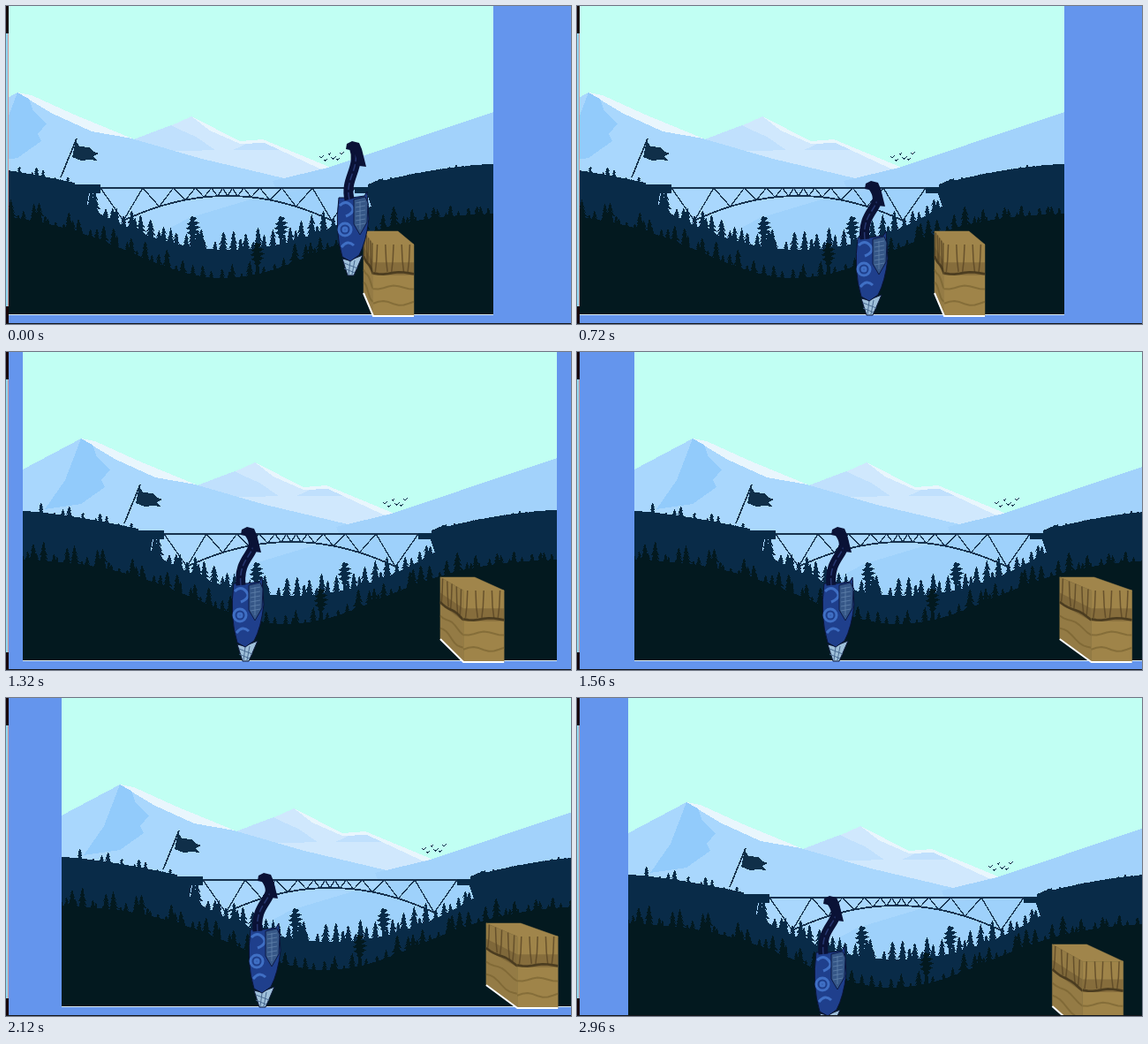
An HTML page for the animation above (3 s loop, 640x360 px).

```html
<!DOCTYPE html>
<html lang="en">
<head>
<meta charset="utf-8">
<title>Mountain bridge</title>
<style>
html, body { margin: 0; width: 100%; height: 100%; overflow: hidden; background: #6495ed; }
svg { display: block; width: 640px; height: 360px; }
</style>
</head>
<body>
<svg id="stage" viewBox="0 0 640 360">
  <clipPath id="frame"><rect y="-60" width="605" height="409"/></clipPath>
  <rect width="640" height="360" fill="#6495ed"/>
  <g id="scenery" shape-rendering="crispEdges">
    <rect y="-60" width="605" height="410" fill="#c1fff3"/>
    <g clip-path="url(#frame)">
      <path fill="#d0e8fd" d="M195 152L228 141 263 125 318 153 344 151 418 183 440 200H200Z"/>
      <path fill="#c0e0fd" d="M195 152L240 135 250 140 268 148 290 163 230 165ZM310 163L330 154 344 152 365 163Z"/>
      <path fill="#e9f6fd" d="M263 125L318 153 344 151 421 183 408 184 346 155 318 156 284 141Z"/>
      <path fill="#a9d7fd" d="M0 133L66 98 145 133 195 150 275 173 368 195 605 192V349H0Z"/>
      <path fill="#e9f6fd" d="M66 98L82 101 128 122 196 150 150 142 104 121Z"/>
      <path fill="#92cbfb" d="M66 98L79 105 84 119 99 133 89 145 93 153 66 172 25 178 48 145Z"/>
      <path fill="#a2d2fb" d="M355 198L418 183 495 157 605 120V260H380Z"/>
      <path fill="#9ed1fb" d="M195 275L260 240 330 219 390 208H470V290Z"/>
      <path stroke="#16324c" stroke-width="1.6" d="M115 194L133 150"/>
      <path fill="#102f49" d="M132 152l4 7 12 1 3 4 7 3-6 3 4 5-9-1-9 1-10-4z"/>
      <g id="birds" fill="#0d3048"></g>
      <g id="bridge" fill="none" stroke="#17324f"></g>
      <g id="forest"></g>
    </g>
    <path stroke="#dcebf2" d="M0 349.5H605"/>
  </g>
  <g id="crate" stroke-linejoin="round"></g>
  <g id="hero">
    <path fill="#9fc0da" stroke="#101c3c" d="M262 331L270 333 285 327 275 350 268 350Z"/>
    <path stroke="#496a91" d="M264 336l15 6M271 334l-2 15M276 333l-3 16M264 342l12 5"/>
    <path fill="#1f3f8c" stroke="#0a1436" d="M258 262H273L287 260 290 255 292 286Q289 312 281 327L271 334 262 329Q253 300 258 262Z"/>
    <g fill="none" stroke="#3f6fc4" stroke-width="3">
      <path d="M259 271q7-7 13 0t-6 12M261 318q7-9 14-2"/>
      <circle cx="265" cy="298" r="7"/><circle cx="265" cy="298" r="2"/>
    </g>
    <path fill="#365787" stroke="#0d1b46" d="M275 264L288 261 291 268 290 290 282 304 275 292Z"/>
    <path id="weave" stroke="#6687b0" stroke-width=".7"/>
    <path id="neck" fill="none" stroke="#0a1236" stroke-width="11"/>
    <path id="sheen" fill="none" stroke="#26366f" stroke-width="1.5" stroke-dasharray="8 3"/>
    <path fill="#0a1236" d="M266 207L267 201 273 198 281 200 284 207 289 227 281 226 275 209Z"/>
  </g>
  <g shape-rendering="crispEdges">
    <rect width="2" height="360" fill="#8fd6f0"/>
    <rect x="2" width="1" height="360" fill="#cf9698"/>
    <path fill="#160508" d="M0 0h3v31H0zM0 340h3v20H0z"/>
    <rect y="359" width="640" height="1" fill="#14161a"/>
  </g>
</svg>
<script>
const LOOP = 3000;
const $ = id => document.getElementById(id);
const steps = (n, fn) => Array.from({ length: n }, (_, i) => fn(i));
const lerp = (a, b, k) => a + (b - a) * k;
const ramp = (t, start, end) => Math.min(1, Math.max(0, (t - start) / (end - start)));

function add(parent, attrs) {
  const el = document.createElementNS('http://www.w3.org/2000/svg', 'path');
  for (const key in attrs) el.setAttribute(key, attrs[key]);
  return parent.appendChild(el);
}

function seeded(seed) {
  return () => (seed = seed * 16807 % 2147483647) / 2147483647;
}
const rand = seeded(77);

function buildBirds() {
  const d = steps(6, i => `M${407 + i * 4.6} ${170 + 4 * Math.sin(i * 2.2)}l3 1 3-2-3 4z`).join('');
  add($('birds'), { d });
}

// The truss panels shrink geometrically towards the middle of the span
function buildBridge() {
  const mid = 304, panels = 11;
  const arch = x => 215 + 28 * ((x - mid) / 118) ** 2;
  const web = side => {
    let x = mid + side * 144, d = `M${x} 206`;
    for (let i = 1; i <= panels; i++) {
      x -= side * 25.9 * .85 ** (i - 1);
      d += `L${x} ${i % 2 ? arch(x) : 206}`;
    }
    return d;
  };
  const curve = steps(60, i => `${mid - 118 + i * 4} ${arch(mid - 118 + i * 4)}`).join('L');
  add($('bridge'), { d: 'M150 206H460', 'stroke-width': 2 });
  add($('bridge'), { d: web(-1) + web(1), 'stroke-width': 1.3 });
  add($('bridge'), { d: `M${curve}`, 'stroke-width': 1.8 });
}

function conifer(x, base, height) {
  const tiers = 5, right = [], left = [];
  for (let i = 1; i <= tiers; i++) {
    const y = base - height + height * i / tiers;
    const w = 1 + height * .24 * i / tiers;
    right.push(`${x + w * (.7 + rand() * .5)} ${y}L${x + w * .45} ${y - 1}`);
    left.unshift(`${x - w * .45} ${y - 1}L${x - w * (.7 + rand() * .5)} ${y}`);
  }
  return `M${x} ${base - height}L${right.join('L')}L${left.join('L')}Z`;
}

function woods(fill, from, to, ground, gap, low, high) {
  let d = `M${from} 349`;
  for (let x = from; x <= to; x += 5) d += `L${x} ${ground(x)}`;
  d += `L${to} ${ground(to)}V349Z`;
  for (let x = from; x < to; x += gap * (.4 + 1.2 * rand())) {
    d += conifer(x, ground(x) + 4, lerp(low, high, rand() ** 1.5));
  }
  add($('forest'), { d, fill });
}

function tallTree(x, top, bottom, fill) {
  const crown = steps(5, i => {
    const y = top + i * 5, w = 4 + 5 * Math.sin(i * Math.PI / 4);
    return `M${x - w} ${y + 3}L${x - 2} ${y - 1}L${x + w} ${y + 1}L${x} ${y + 6}Z`;
  });
  add($('forest'), { d: `M${x - 1} ${top}h2l1 ${bottom - top}h-4z${crown.join('')}`, fill });
}

function buildForest() {
  const navy = '#092b48', dark = '#03191f';
  const valley = x => 276 - 52 * ((x - 306) / 165) ** 2;
  const front = x => 234 + 74 * Math.exp(-(((x - 300) / 150) ** 2));
  woods(navy, 0, 130, x => 180 + 20 * (x / 130) ** 1.4, 13, 5, 15);
  woods(navy, 130, 476, valley, 8, 12, 28);
  woods(navy, 470, 605, x => 179 + 21 * ((605 - x) / 135) ** 1.6, 9, 3, 7);
  add($('forest'), { d: 'M125 200L130 202H160V212H147L144 230H120ZM480 195L463 202V205H448V212H462L468 230H485Z', fill: navy });
  for (const x of [265, 365]) tallTree(x, 239, 290, navy);
  woods(dark, 0, 605, front, 8, 8, 26);
  tallTree(338, 269, 320, dark);
}

// Crate corners sit on two depth planes that scroll at different rates
const FAR = { depth: 1.2, left: 405, right: 444, top: 255, bottom: 325 };
const NEAR = { depth: 1.41, left: 416, right: 462, top: 270, bottom: 351 };
const HERO_DEPTH = 1.3;

const planks = steps(5, i => {
  const s = (i + .5) / 5, lean = i % 2 ? .05 : -.05;
  return [[s, 0], [s + lean / 3, .22], [s + lean, .38]];
});
const wave = (t, size, phase) => steps(9, i => [i / 8, t + size * Math.sin(i * .9 + phase)]);
const seam = [wave(.4, .015, 0)];
const grain = [wave(.6, .025, 1), wave(.82, .03, 3)];
const shadow = [[[0, .25], [1, .25], [1, .43], [0, .43]]];

const crate = $('crate');
const line = (stroke, width, opacity) =>
  add(crate, { fill: 'none', stroke, 'stroke-width': width, opacity });
const makeFace = fill => ({
  fill: add(crate, { fill, stroke: fill, 'stroke-width': .5 }),
  shade: add(crate, { fill: '#5f4c28', opacity: .4 }),
  thin: line('#5a4726', 1.5, .8), thick: line('#42351c', 2.6, .85), soft: line('#75602f', 2, .6)
});
const topFace = makeFace('#a0854b');
const sideFace = makeFace('#947b45');
const frontFace = makeFace('#9f8449');
const outline = line('#fff', 2, 1);

function drawFace(face, [a, b, c, d], isTop) {
  const at = ([s, t]) => [0, 1].map(k =>
    lerp(lerp(a[k], b[k], s), lerp(d[k], c[k], s), t).toFixed(1)).join(' ');
  const path = lines => lines.map(pts => `M${pts.map(at).join('L')}`).join('');
  face.fill.setAttribute('d', `M${[a, b, c, d].join('L')}Z`);
  if (isTop) return;
  face.shade.setAttribute('d', `${path(shadow)}Z`);
  face.thin.setAttribute('d', path(planks));
  face.thick.setAttribute('d', path(seam));
  face.soft.setAttribute('d', path(grain));
}

function drawCrate(camX, camY) {
  const [far, near] = [FAR, NEAR].map(({ depth, left, right, top, bottom }) => {
    const dx = camX * depth, dy = camY * depth;
    return [[left + dx, top + dy], [right + dx, top + dy], [right + dx, bottom + dy], [left + dx, bottom + dy]];
  });
  drawFace(topFace, [far[0], far[1], near[1], near[0]], true);
  drawFace(sideFace, [far[0], near[0], near[3], far[3]]);
  drawFace(frontFace, near);
  outline.setAttribute('d', `M${[far[3], near[3], near[2]].join('L')}`);
}

// The neck straightens while the hero is in the air
function drawNeck(air) {
  const d = `M${266 + 4 * air} 264C${262 + 2 * air} ${228 + 12 * air} ${292 - 8 * air} 228 275 204`;
  $('neck').setAttribute('d', d);
  $('sheen').setAttribute('d', d);
}

const move = (id, x, y) => $(id).setAttribute('transform', `translate(${Math.round(x)} ${Math.round(y)})`);

function render(time) {
  const t = time % LOOP;
  const fall = ramp(t, 0, 220);
  const heroX = 393 - 56 * fall - 194.5 * ramp(t, 710, 1466);
  const follow = Math.max(0, (274 - heroX) / HERO_DEPTH);
  const camX = follow + 24 * ramp(t, 1466, 1600) - 14 * ramp(t, 1960, 2200);
  const camY = 20 * ramp(t, 2560, 2780);
  const lift = 45 * (1 - fall * (.6 + .4 * fall));
  move('scenery', camX - 53, camY);
  move('hero', heroX + camX * HERO_DEPTH - 274, camY * HERO_DEPTH - lift);
  drawNeck(1 - fall);
  drawCrate(camX, camY);
}

$('weave').setAttribute('d', steps(6, i => `M277 ${268 + i * 5}l11-2`).join('') + 'M282 266v32');
buildBirds();
buildBridge();
buildForest();
render(0);
const begin = performance.now();
requestAnimationFrame(function tick() {
  render(performance.now() - begin);
  requestAnimationFrame(tick);
});
</script>
</body>
</html>
```
